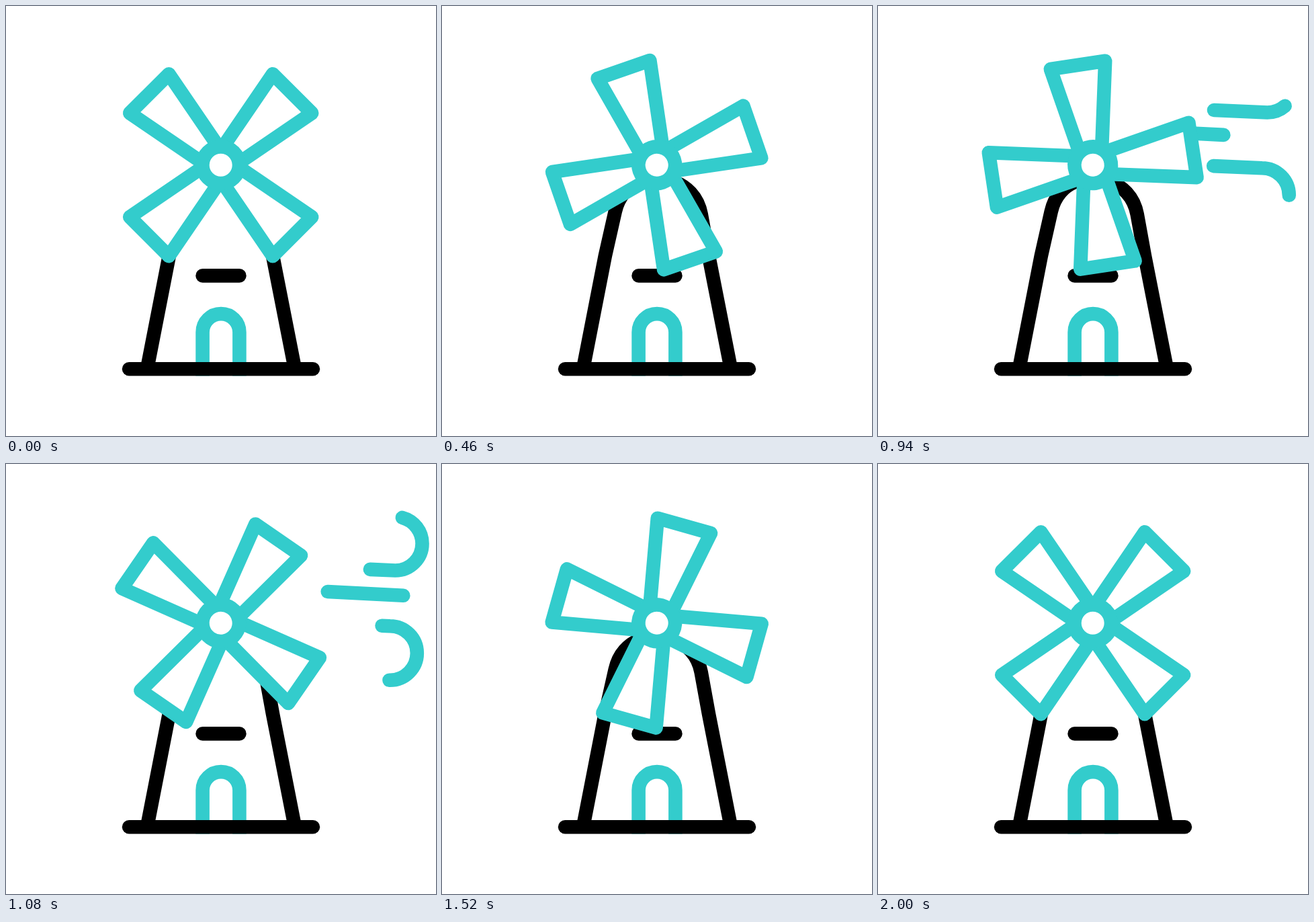
Write an HTML page with a canvas that moves like this. It is 640x640 px and loops after 2400 ms.

```html
<!DOCTYPE html>
<html lang="en">
<head>
<meta charset="utf-8">
<title>Windmill</title>
<style>
html, body { margin: 0; width: 100%; height: 100%; overflow: hidden; background: #fff; }
canvas { display: block; width: 640px; height: 640px; }
</style>
</head>
<body>
<canvas id="stage" width="640" height="640"></canvas>
<script>
const ctx = document.getElementById('stage').getContext('2d');
const LOOP = 2400, STEP = 20, WIDTH = 20.6;
const TEAL = '#33cccc', BLACK = '#000', WHITE = '#fff';
const HUB = { x: 319.7, y: 236.7 };

// Spin keys: time in ms, angle in degrees, speed in degrees per ms
const SPIN = [
  [0, 0, 0], [460, 115.9, 0.52], [780, 339.8, 0.88], [1080, 619.6, 0.95],
  [1240, 768.8, 0.88], [1520, 960.7, 0.515], [2000, 1080, 0]
];

function spinAt(t) {
  if (t >= 2000) return 0;
  let i = 0;
  while (t >= SPIN[i + 1][0]) i++;
  const [t0, a0, v0] = SPIN[i], [t1, a1, v1] = SPIN[i + 1];
  const d = t1 - t0, u = (t - t0) / d, w = 1 - u;
  return a0 * w * w * (1 + 2 * u) + a1 * u * u * (3 - 2 * u)
    + d * u * w * (v0 * w - v1 * u);
}

function ease(t, start, length) {
  const u = Math.min(1, Math.max(0, (t - start) / length));
  return u * u * (3 - 2 * u);
}

function gust(x0, y0, x1, y1, head, tail, r = 0, from = 0, to = 0) {
  const path = new Path2D();
  path.moveTo(x0, y0);
  path.lineTo(x1, y1);
  let length = Math.hypot(x1 - x0, y1 - y0);
  if (r) {
    const cy = from > 0 ? y1 - r : y1 + r;
    path.arc(x1, cy, r, from, to, from > to);
    length += r * Math.abs(to - from);
  }
  return { path, length, head, tail };
}

const Q = Math.PI / 2;
const GUSTS = [
  gust(500, 155, 579.5, 158.5, 732, 943, 40, Q, -Q + 0.03),
  gust(458, 189, 615, 197, 778, 973),
  gust(496, 238, 571.5, 241.2, 690, 905, 40.3, -Q, Q + 0.03)
];

const TOWER = new Path2D(
  'M210 540L242.8 372L257.7 306C263 282 278 268 293 262' +
  'Q320 252 347 262C362 268 380.5 282 385.7 310L397 372L430 540');
const DOOR = new Path2D('M292.6 550.5V485.5A27.4 27.4 0 0 1 347.4 485.5V550.5');
const WINDOW = new Path2D('M292.6 401.4H347.4');
const GROUND = new Path2D('M183.1 540.3H456.9');
const BLADE = new Path2D('M5 -29.5L77.3 -135.5L135.5 -77.3L29.5 -5');
const RING = new Path2D();
RING.arc(0, 0, 27.3, 0, 4 * Q);

function stroke(path, color, cap = 'round') {
  ctx.strokeStyle = color;
  ctx.lineCap = cap;
  ctx.stroke(path);
}

function drawWind(t) {
  for (const g of GUSTS) {
    const head = ease(t, g.head, 400), tail = ease(t, g.tail, 470);
    if (head - tail < 0.001) continue;
    ctx.setLineDash([(head - tail) * g.length, 2000]);
    ctx.lineDashOffset = -tail * g.length;
    stroke(g.path, TEAL);
  }
  ctx.setLineDash([]);
}

function drawSails(t) {
  ctx.save();
  ctx.translate(HUB.x, HUB.y);
  ctx.rotate(spinAt(t) * Math.PI / 180);
  ctx.fillStyle = WHITE;
  for (let i = 0; i < 4; i++) {
    ctx.fill(BLADE);
    stroke(BLADE, TEAL);
    ctx.rotate(Q);
  }
  ctx.fill(RING);
  stroke(RING, TEAL);
  ctx.restore();
}

function draw(t) {
  ctx.fillStyle = WHITE;
  ctx.fillRect(0, 0, 640, 640);
  ctx.lineWidth = WIDTH;
  ctx.lineJoin = 'round';
  stroke(DOOR, TEAL, 'butt');
  stroke(TOWER, BLACK, 'butt');
  stroke(WINDOW, BLACK);
  stroke(GROUND, BLACK);
  drawWind(t);
  drawSails(t);
}

const start = performance.now();
function frame(now) {
  const t = Math.max(0, now - start) % LOOP;
  draw(Math.floor((t + 2) / STEP) * STEP % LOOP);
  requestAnimationFrame(frame);
}
draw(0);
requestAnimationFrame(frame);
</script>
</body>
</html>
```
